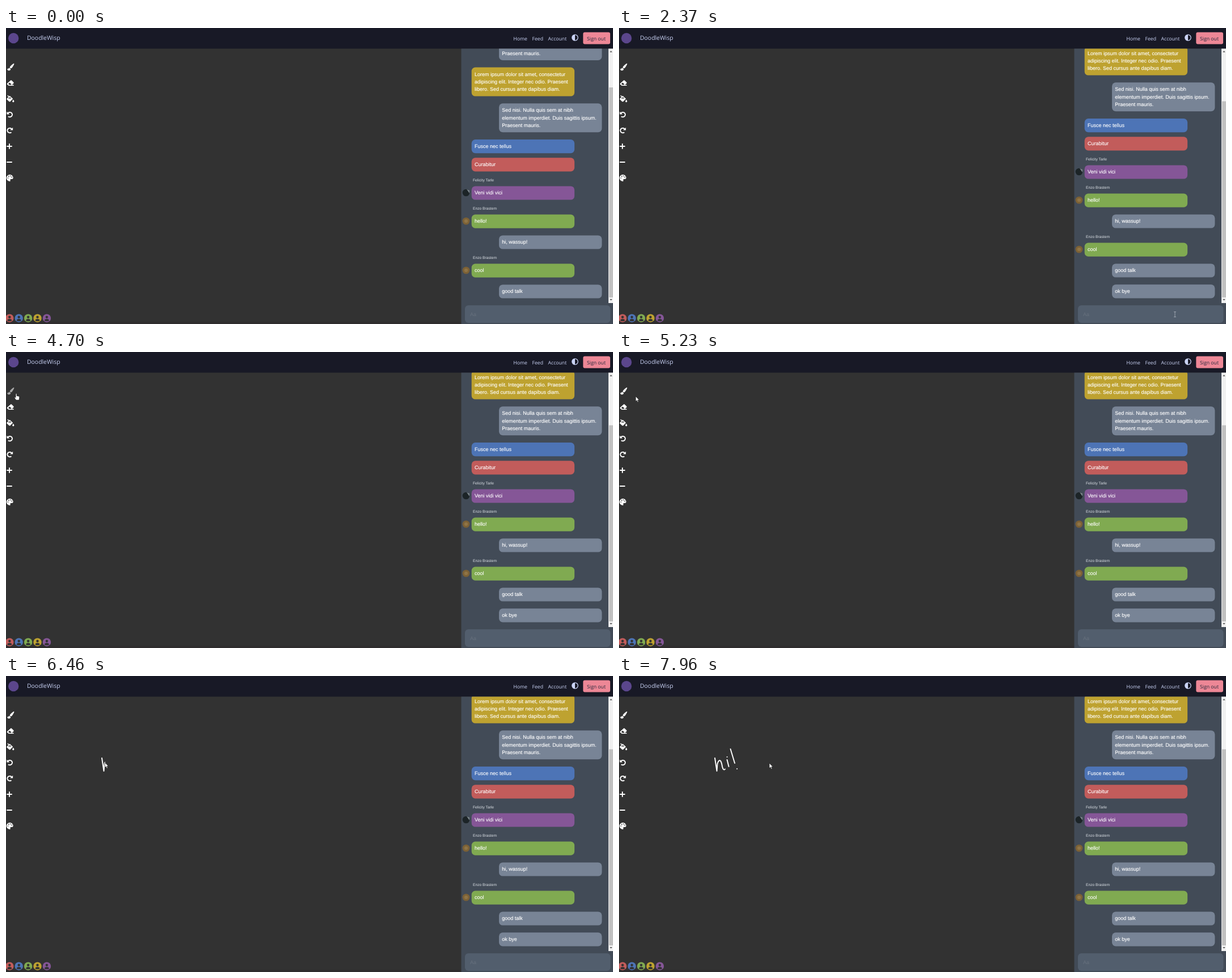
Animation of 1070x523 px, one loop 7990 ms. Source, as an HTML page:

```html
<!DOCTYPE html>
<html lang="en">
<head>
<meta charset="utf-8">
<title>Drawing board with chat</title>
<style>
  html, body { margin: 0; width: 100%; height: 100%; overflow: hidden; background: #323232; }
  svg { display: block; width: 100vw; height: 100vh; }
  text { white-space: pre; text-rendering: geometricPrecision; }
  .nav text { font: 8.7px "Open Sans", sans-serif; fill: #cad3f5; }
  .chat text { font: 9px "Liberation Sans", Arial, sans-serif; fill: #fff; }
  .chat .bubble text { stroke: #fff; stroke-width: 0.15; }
  .chat .bubble .name { font-size: 6.7px; fill: #dfe3e8; stroke: none; }
  .line { fill: none; stroke: #fff; stroke-width: 1.9; }
</style>
</head>
<body>
<svg viewBox="0 0 1070 523">
  <defs><clipPath id="view"><rect x="802" y="36.5" width="260" height="449.5"/></clipPath></defs>
  <rect width="1070" height="523" fill="#323232"/>
  <rect y="519" width="803" height="4" fill="#2f2d2e"/>

  <g class="nav">
    <rect width="1070" height="36.5" fill="#181926"/>
    <circle cx="13.2" cy="18" r="9.2" fill="#5b468c"/>
    <text x="37" y="20.8" style="font-size:10.4px">DoodleWisp</text>
    <text x="894.3" y="21.5">Home</text>
    <text x="927.5" y="21.5">Feed</text>
    <text x="955.5" y="21.5">Account</text>
    <circle cx="1003" cy="17" r="5.2" fill="none" stroke="#cad3f5" stroke-width="1.3"/>
    <path d="M1003 11.8a5.2 5.2 0 0 0 0 10.4z" fill="#cad3f5"/>
    <rect x="1017.3" y="7.5" width="47.7" height="21" rx="3" fill="#ed8796"/>
    <text x="1024" y="21.5" style="fill:#24273a">Sign out</text>
  </g>

  <g fill="#fff">
    <path id="brush" d="M14.2 62.8Q15.2 63.8 10.8 70Q9.3 71.8 7.8 71L6.8 70Q6.3 68.6 8 67.2Q13 62 14.2 62.8zM6 70.6L8.3 72.6Q8 75.3 5 75.3Q2.2 75.2 2 71.6Q3.3 73 3.8 72.2Q4.4 70.6 6 70.6z"/>
    <path fill-rule="evenodd" d="M1.8 98.2L8.2 92.6Q9 92 9.8 92.6L13.4 96Q14 97 13.4 97.7L10.2 100.6H13.6V102H5L1.8 99.4zM4 98.8L6.4 96.6L9.7 99.6L8.6 100.6H5.8z"/>
    <path fill-rule="evenodd" d="M1.3 125L6.5 119.8L12.2 125L7.4 130Q6.5 130.7 5.5 130L1.3 126zM3.6 124.6L6.5 121.8L9.6 124.6z"/>
    <path class="line" style="stroke-width:1.4" d="M2.8 119.2L6.6 123"/>
    <path d="M12.8 126.4Q14.6 129 14.4 129.6A1.6 1.6 0 0 1 11.2 129.6Q11.2 128.8 12.8 126.4z"/>
    <g id="turn">
      <path class="line" d="M3.2 151A4.2 4.2 0 1 1 4 156.2"/>
      <path d="M1.3 147.8V152.6H6.1z"/>
    </g>
    <use href="#turn" transform="translate(13.4 28) scale(-1 1)"/>
    <path class="line" d="M1.3 209H10.7M6 204.3V213.7M1.3 237H10.7"/>
    <path d="M6.8 259.1A5.9 5.9 0 0 1 12.7 265Q12.5 267 10 267H8.4Q6.9 267.4 7.6 269Q8.2 270.9 6.5 270.9A5.9 5.9 0 0 1 6.8 259.1z"/>
    <path d="M3.4 265h.01M4.6 262.2h.01M7.6 261.3h.01M10.2 263.4h.01" stroke="#323232" stroke-width="1.7" stroke-linecap="round"/>
  </g>

  <g id="people"></g>
  <g id="ink" stroke-linecap="round" stroke-linejoin="round"></g>

  <g class="chat">
    <rect x="802.5" y="36.5" width="267.5" height="486.5" fill="#424b57"/>
    <g clip-path="url(#view)"><g id="messages" class="bubble"></g></g>
    <rect x="1062" y="36.5" width="8" height="449.5" fill="#f1f1f1"/>
    <rect id="thumb" x="1063" width="7" fill="#c1c1c1"/>
    <path d="M1064.3 42.8h4.4l-2.2-2.6zM1064.3 479h4.4l-2.2 2.6z" fill="#505050"/>
    <rect x="809" y="490" width="256.5" height="31" rx="6" fill="#525e6d"/>
    <text id="hint" x="818" y="508.7" style="fill:#67717e">Aa</text>
    <text id="typed" x="818" y="508.7"></text>
    <rect id="caret" y="501" width="0.9" height="10" fill="#fff"/>
  </g>

  <path id="ibeam" d="M-2-4.5H2M0-4.5V4.5M-2 4.5H2" stroke="#a3abb5" stroke-width="0.9"/>
  <path id="arrow" d="M0 0V9L2.1 7.1L3.5 10.4L5 9.8L3.6 6.6H6.3z" fill="#fff" stroke="#111" stroke-width="0.6"/>
  <path id="hand" d="M-1 .8Q0-.8 1 .8V4.4L4.8 5.2Q6 5.6 5.8 7L5 12H-.4L-3 8Q-3.4 6.4-2 6.6L-1 7.6z" fill="#fff" stroke="#111" stroke-width="0.7"/>
</svg>
<script>
const DURATION = 7990, SENT = 1980, SCROLL = 37, LINE = 13.4;
const $ = id => document.getElementById(id);
const color = { red: '#c25c5b', blue: '#4d74b6', green: '#80aa51', yellow: '#bea230', purple: '#855697', gray: '#788496' };

$('people').innerHTML = ['red', 'blue', 'green', 'yellow', 'purple'].map((tone, i) =>
  `<g transform="translate(${6.3 + i * 16.4} 512.7)"><circle r="7.2" fill="${color[tone]}"/>
   <circle cy="-2" r="2.2" fill="#323232"/><path d="M-4.2 4.2Q-3.6 1.2 0 1.2T4.2 4.2Q0 6.8-4.2 4.2z" fill="#323232"/></g>`).join('');

// Own messages are gray and sit on the right.
const passage = 'Sed nisi. Nulla quis sem at nibh\nelementum imperdiet. Duis sagittis ipsum.\nPraesent mauris.';
const messages = [
  ['gray', passage],
  ['yellow', 'Lorem ipsum dolor sit amet, consectetur\nadipiscing elit. Integer nec odio. Praesent\nlibero. Sed cursus ante dapibus diam.'],
  ['gray', passage],
  ['blue', 'Fusce nec tellus'],
  ['red', 'Curabitur'],
  ['purple', 'Veni vidi vici', 'Felicity Tarle'],
  ['green', 'hello!', 'Enzo Brastem'],
  ['gray', 'hi, wassup!'],
  ['green', 'cool', 'Enzo Brastem'],
  ['gray', 'good talk'],
  ['gray', 'ok bye']
];

function avatar(y, tone) {
  return tone === 'purple'
    ? `<circle cx="811" cy="${y}" r="6.3" fill="#1c2427"/><path d="M812 ${y - 6}l5 2v5z" fill="#7d878d"/>`
    : `<circle cx="811" cy="${y}" r="6.4" fill="#7c6136"/><circle cx="811" cy="${y}" r="3.2" fill="#8f7446"/>`;
}

function layOutMessages() {
  let bottom = -6.8, previous = 'gray', html = '';
  for (const [tone, body, name] of messages) {
    const lines = body.split('\n');
    const grouped = tone !== 'gray' && previous !== 'gray';
    const y = bottom + (name ? 25.9 : grouped ? 8.1 : 12.7);
    const x = tone === 'gray' ? 869 : 820.7;
    const height = 24.2 + (lines.length - 1) * LINE;
    html += `<rect x="${x}" y="${y}" width="181.4" height="${height}" rx="6.7" fill="${color[tone]}"/>`;
    html += lines.map((line, i) => `<text x="${x + 5.2}" y="${Math.round(y + 14.9 + i * LINE)}">${line}</text>`).join('');
    if (name) html += `<text class="name" x="823" y="${Math.round(y - 8.6)}">${name}</text>` + avatar(y + 11.6, tone);
    bottom = y + height;
    previous = tone;
  }
  $('messages').innerHTML = html;
}
layOutMessages();

// Pointer gestures; the pointer glides straight from the end of one to the start of the next.
const gestures = [
  { from: 20, to: 560, d: 'M1017 522L982 504L980 506' },
  { from: 3650, to: 3880, d: 'M980 506L35 90' },
  { from: 4450, to: 5080, d: 'M18 73h.1' },
  { from: 5280, to: 5750, d: 'M33 80L178 144.5' },
  { from: 6110, to: 6700, d: 'M169 145L172.5 168L173.5 155Q176 147 179 150Q181 153 182 160Q184 168 187 164.5', pen: true },
  { from: 6760, to: 6840, d: 'M190.5 148L193.5 160', pen: true },
  { from: 6880, to: 6900, d: 'M190.5 143h.1', pen: true },
  { from: 6980, to: 7100, d: 'M196.5 129L204 154', pen: true },
  { from: 7230, to: 7250, d: 'M208 164h.1', pen: true },
  { from: 7500, to: 7960, d: 'M175 162L186 163Q215 212 265 154' }
];
for (const g of gestures) {
  g.path = document.createElementNS('http://www.w3.org/2000/svg', 'path');
  g.path.setAttribute('d', g.d);
  g.path.setAttribute('class', 'line');
  g.length = g.path.getTotalLength();
  if (g.pen) $('ink').append(g.path);
}

const clamp = v => Math.min(1, Math.max(0, v));
const within = (t, from, to) => t >= from && t < to;
const show = (id, on) => $(id).style.display = on ? '' : 'none';

function pointerAt(time) {
  const next = gestures.findIndex(g => g.from > time);
  const last = gestures.at(next < 0 ? -1 : Math.max(0, next - 1));
  const a = last.path.getPointAtLength(last.length * clamp((time - last.from) / (last.to - last.from)));
  if (next < 1 || time < last.to) return a;
  const target = gestures[next], b = target.path.getPointAtLength(0);
  const k = (time - last.to) / (target.from - last.to);
  return { x: a.x + (b.x - a.x) * k, y: a.y + (b.y - a.y) * k };
}

function render(time) {
  const sent = time >= SENT;
  $('messages').setAttribute('transform', `translate(0 ${sent ? -SCROLL : 0})`);
  const top = sent ? 129.5 : 105;
  $('thumb').setAttribute('y', top);
  $('thumb').setAttribute('height', 476 - top);

  const typed = sent ? '' : 'ok bye'.slice(0, Math.max(0, Math.floor((time - 1290) / 112) + 1));
  $('typed').textContent = typed;
  show('hint', !typed);
  $('caret').setAttribute('x', 818 + (typed ? $('typed').getComputedTextLength() : 0));
  show('caret', within(time, 560, 1020) || within(time, 1290, 2370) || within(time, 2900, 3450));

  for (const { from, to, path, length } of gestures.filter(g => g.pen)) {
    path.style.display = time < from ? 'none' : '';
    path.style.strokeDasharray = `${length * clamp((time - from) / (to - from))} ${length + 1}`;
  }

  const hover = within(time, 4200, 5150);
  $('brush').setAttribute('fill', hover ? '#a6a6a6' : '#fff');
  const { x, y } = pointerAt(time);
  const pointer = time < 20 ? '' : time < 3660 ? 'ibeam' : hover ? 'hand' : 'arrow';
  for (const id of ['ibeam', 'arrow', 'hand']) {
    show(id, id === pointer);
    $(id).setAttribute('transform', `translate(${x} ${y})`);
  }
}

const start = performance.now();
function tick() {
  render((performance.now() - start) % DURATION);
  requestAnimationFrame(tick);
}
tick();
</script>
</body>
</html>
```
